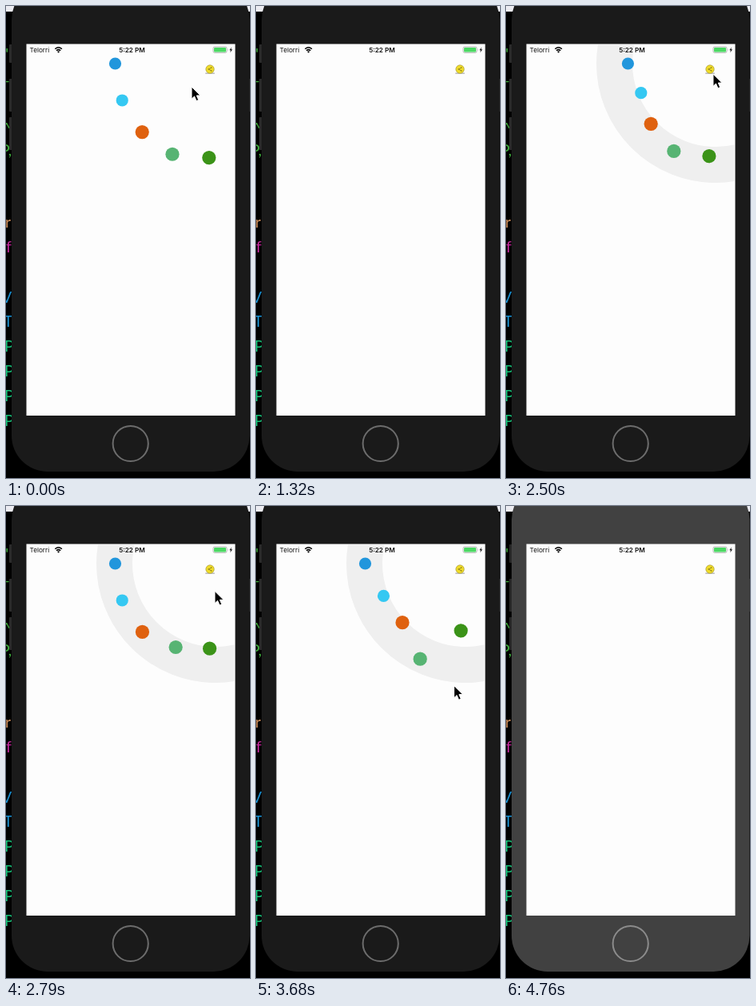
An HTML page that plays this animation: 305x590 px, repeating every 4790 ms.

```html
<!DOCTYPE html>
<html lang="en">
<head>
<meta charset="utf-8">
<title>Radial share menu</title>
<style>
  html, body { margin: 0; width: 100%; height: 100%; overflow: hidden; background: #000; }
  svg { display: block; width: 305px; height: 590px; }
  text { font-family: Inter, "Open Sans", sans-serif; }
  .code text { font: 400 19.5px Lato, "Open Sans", sans-serif; }
  .body { fill: #1a1a1a; }
  .key { fill: #2b2b2b; }
  .home { fill: none; stroke: #6c6c6c; stroke-width: 2; }
  .dim .body { fill: #414141; }
  .dim .key { fill: #262626; }
  .dim .home { stroke: #8b8b8b; }
</style>
</head>
<body>
<svg id="stage" viewBox="0 0 305 590">
  <defs>
    <clipPath id="view"><rect x="25.5" y="48.4" width="259.8" height="463"/></clipPath>
  </defs>

  <rect width="305" height="590"/>
  <rect width="305" height="7" fill="#ececf2"/>
  <g class="code">
    <g fill="#3fae3c">
      <text x="-4" y="67">"</text><text x="-6" y="100">–</text>
      <text x="-5" y="160">^</text><text x="-7" y="187">P,</text>
    </g>
    <text x="-1" y="277" fill="#c98a58">r</text>
    <text x="0" y="308" fill="#c4289c">f</text>
    <g fill="#1a8fd0"><text x="-6" y="371">V</text><text x="-3" y="401">T</text></g>
    <g fill="#16c078">
      <text x="-2" y="432">P</text><text x="-2" y="463">P</text>
      <text x="-2" y="494">P</text><text x="-2" y="525">P</text>
    </g>
  </g>

  <g class="key">
    <rect x="4" y="48" width="5" height="23" rx="1"/>
    <rect x="4" y="91" width="5" height="41" rx="1"/>
    <rect x="4" y="139" width="5" height="41" rx="1"/>
    <rect x="302" y="91" width="5" height="41" rx="1"/>
  </g>
  <rect class="body" x="7" y="-28" width="297.5" height="610" rx="45"/>
  <circle class="home" cx="155.7" cy="547" r="22.1"/>
  <rect x="25.5" y="47.5" width="261" height="464.5" fill="#fdfdfd"/>

  <circle id="ring" cx="262" cy="72" r="126.5" fill="none" stroke="#efefef" stroke-width="45" clip-path="url(#view)"/>

  <g fill="#111">
    <text x="29.5" y="58" font-size="8.2">Telorri</text>
    <text x="157.5" y="58" font-size="8.2" font-weight="600" text-anchor="middle">5:22 PM</text>
    <g fill="none" stroke="#000" stroke-width="1.5">
      <path d="M61.3 53.8Q65.6 49.8 69.9 53.8"/>
      <path d="M63 55.8Q65.6 53.4 68.2 55.8"/>
    </g>
    <path d="M64 57Q65.6 55.6 67.2 57L65.6 58.8Z"/>
    <rect x="259" y="51" width="17" height="7.4" rx="1.8" fill="none" stroke="#9a9a9a" stroke-width=".7"/>
    <rect x="260" y="52" width="15" height="5.4" rx="1" fill="#4cd964"/>
    <path d="M277 53.4q1 1.3 0 2.6z" fill="#9a9a9a"/>
    <path d="M281.9 51.4l-2.6 3.8h1.6l-.7 3 2.8-4h-1.7z"/>
  </g>

  <g id="icons"></g>

  <rect x="249" y="83.4" width="12" height="1.4" rx=".7" fill="#a9a9a9"/>
  <circle cx="255" cy="79" r="5.2" fill="#f0dc2a" stroke="#a89c3a" stroke-width=".7"/>
  <path d="M256.8 77L253.2 79L256.8 81" fill="none" stroke="#80741c" stroke-width=".8"/>
  <g fill="#80741c">
    <circle cx="256.8" cy="77" r=".7"/><circle cx="253.2" cy="79" r=".7"/><circle cx="256.8" cy="81" r=".7"/>
  </g>

  <path id="cursor" d="M.5 0V15.2L4 11.9L6.5 17.6L9.2 16.4L6.8 10.9H11.5Z" stroke="#fff"/>
</svg>
<script>
const LOOP = 4790;
const STEP = 146.4;   // the picture refreshes once per step
const REST = 125.5, NEAR = 100;
const STEP_ANGLE = 21.5 * Math.PI / 180;
const COLORS = ["#2196dc", "#35c8f2", "#df610f", "#57b473", "#3b9318"];
const LAST = COLORS.length - 1;

// Each icon passes evenly spaced radii; the next one follows after a delay.
const OPEN = { radii: [0, 129, NEAR, REST], time: 650, delay: 80 };
const CLOSE = { radii: [REST, NEAR, 140, 0], time: 480, delay: 96 };

// Two rounds: when the menu opens and closes, and the pointer's stops as [time, x, y].
const ROUNDS = [
  { open: -905, close: 228,
    pointer: [[0, 231.5, 101], [150, 256, 78], [300, 256, 79], [1025, 270, 541], [1172, 249.5, 457.5]] },
  { open: 1974, close: 3276, ring: [1900, 4240],
    pointer: [[1610, 280, 172], [1900, 257.5, 75], [2350, 257.5, 75], [2780, 260.5, 106.5],
      [3220, 260, 85], [3661, 247, 225]] }
];

const $ = id => document.getElementById(id);
const show = (el, on) => el.setAttribute("visibility", on ? "visible" : "hidden");
const mix = (a, b, k) => a + (b - a) * k;

const icons = COLORS.map((color, i) => {
  const dot = document.createElementNS("http://www.w3.org/2000/svg", "circle");
  dot.setAttribute("r", i < 2 ? 7.6 : 8.6);
  dot.setAttribute("fill", color);
  return $("icons").appendChild(dot);
});

function along(radii, p) {
  const s = Math.min(Math.max(p, 0), 1) * (radii.length - 1);
  const i = Math.min(Math.floor(s), radii.length - 2);
  return mix(radii[i], radii[i + 1], s - i);
}

function radiusAt(round, t, i) {
  const closing = (t - round.close - (LAST - i) * CLOSE.delay) / CLOSE.time;
  if (closing > 0) return along(CLOSE.radii, closing);
  return along(OPEN.radii, (t - round.open - i * OPEN.delay) / OPEN.time);
}

function pointerAt(path, t) {
  const n = path.findIndex(stop => stop[0] > t);
  if (n < 1) return null;
  const [[t0, x0, y0], [t1, x1, y1]] = path.slice(n - 1, n + 1);
  const k = (t - t0) / (t1 - t0);
  return [mix(x0, x1, k), mix(y0, y1, k)];
}

function draw(t) {
  const round = ROUNDS[t < 1500 ? 0 : 1];
  icons.forEach((dot, i) => {
    const r = radiusAt(round, t, i), angle = i * STEP_ANGLE;
    dot.setAttribute("cx", 262 - r * Math.cos(angle));
    dot.setAttribute("cy", 72 + r * Math.sin(angle));
    show(dot, r > 0);
  });
  show($("ring"), round.ring && t >= round.ring[0] && t < round.ring[1]);
  const tip = pointerAt(round.pointer, t);
  show($("cursor"), tip);
  if (tip) $("cursor").setAttribute("transform", `translate(${tip})`);
}

const start = performance.now();
function frame() {
  const t = (performance.now() - start) % LOOP;
  draw(Math.floor(t / STEP) * STEP);
  $("stage").classList.toggle("dim", t >= 4760);
  requestAnimationFrame(frame);
}
frame();
</script>
</body>
</html>
```
